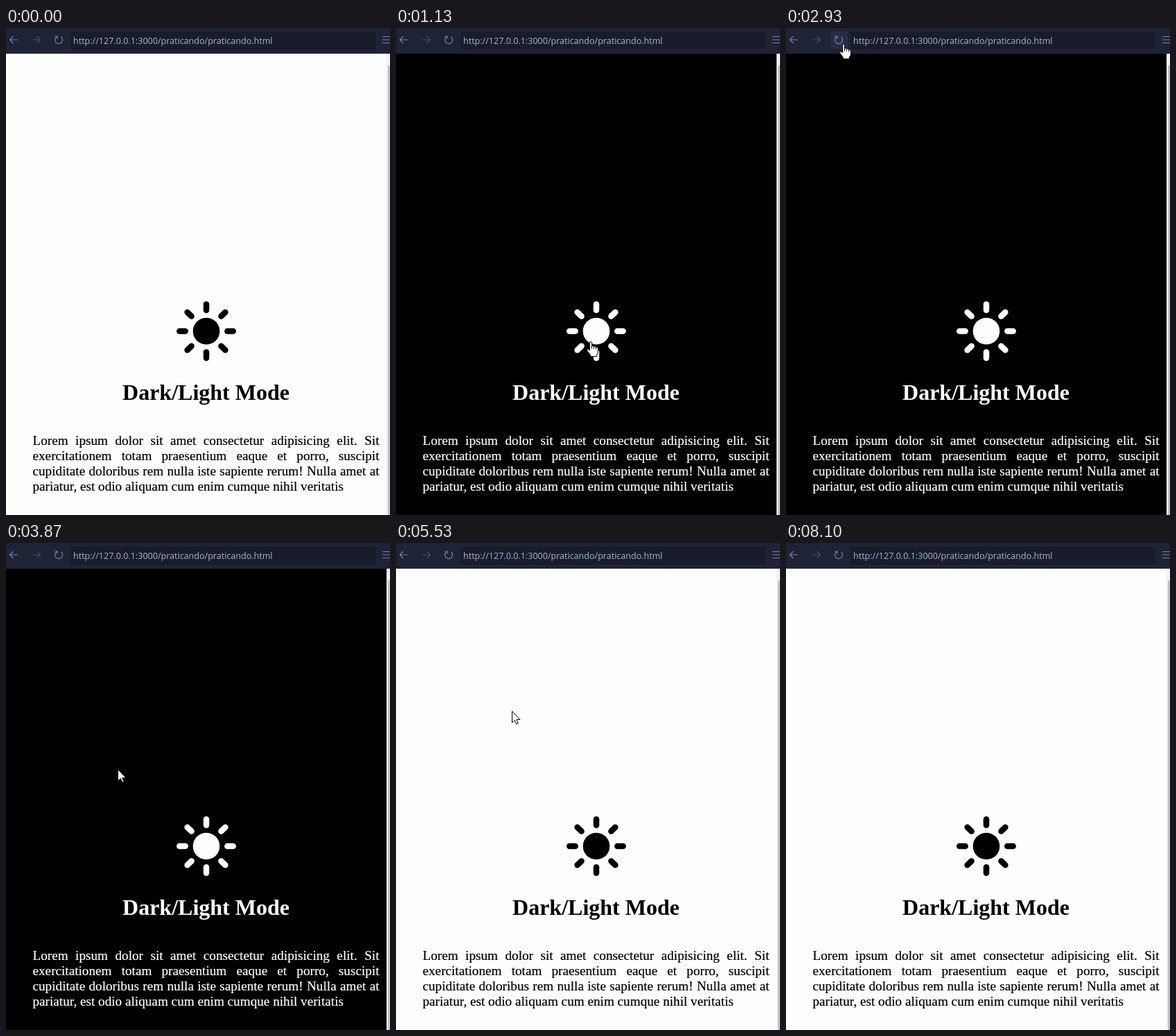
Recreate the animation shown at these times as an HTML page. Size 554 by 702 pixels, loop 8.13 s.

```html
<!DOCTYPE html>
<html lang="en">
<head>
<meta charset="utf-8">
<title>Dark/Light Mode</title>
<style>
  html, body { margin: 0; width: 100%; height: 100%; overflow: hidden; }
  body { --paper: #fefefe; --ink: #000; position: relative; background: var(--paper); color: var(--ink); }
  body.dark { --paper: #000; --ink: #fefefe; }
  svg { position: absolute; left: 0; top: 0; }
  p {
    position: absolute; left: 38.5px; width: 500px; margin: 0; white-space: nowrap;
    font: 19.2px/21px "Liberation Serif", serif; text-align-last: justify;
    -webkit-text-stroke: .2px var(--ink);
  }
  p:last-of-type { text-align-last: left; }
</style>
</head>
<body>
<p style="top:584px">Lorem ipsum dolor sit amet consectetur adipisicing elit. Sit</p>
<p style="top:606px">exercitationem totam praesentium eaque et porro, suscipit</p>
<p style="top:628px">cupiditate doloribus rem nulla iste sapiente rerum! Nulla amet at</p>
<p style="top:650px">pariatur, est odio aliquam cum enim cumque nihil veritatis</p>

<svg width="554" height="702" viewBox="0 0 554 702">
  <!-- browser toolbar -->
  <rect width="554" height="37" fill="#1f2336"/>
  <rect x="93" y="5" width="440" height="26" fill="#191c2a"/>
  <rect id="hover" x="65" y="5" width="24" height="25" fill="#2b2d45"/>
  <g fill="none" stroke="#7884a8" stroke-width="1.2">
    <path d="M17 17H5.5M10.5 12L5.5 17L10.5 22"/>
    <path stroke="#465070" d="M38 17H49.500M44.500 12L49.500 17L44.500 22"/>
    <path d="M73 12.600A5.500 5.500 0 1 0 79.500 12.800M70.500 12H74V15.500"/>
    <path d="M543 12.500H554M543 17H554M543 21.500H554"/>
  </g>
  <text x="97" y="23" font-family="'Open Sans', sans-serif" font-size="12.55" fill="#a9b1d6">http://127.0.0.1:3000/praticando/praticando.html</text>

  <!-- scrollbar -->
  <rect x="549" y="37" width="5" height="665" fill="#f1f1f1"/>
  <rect x="551" y="54" width="3" height="648" fill="#c1c1c1"/>

  <g id="sun" transform="translate(289 437)" fill="var(--ink)" stroke="var(--ink)">
    <circle r="19.3" stroke="none"/>
  </g>
  <text x="288.500" y="536" text-anchor="middle" font-family="'Liberation Serif', serif" font-size="32" font-weight="bold" fill="var(--ink)">Dark/Light Mode</text>

  <g id="cursor" fill="#fff" stroke="#000" stroke-width="1" stroke-linejoin="round">
    <path id="arrow" d="M.5 .5V17L4.300 13.500L6.800 19L9.200 18L6.800 12.500H12Z"/>
    <path id="hand" d="M-1.500 1.500A1.500 1.500 0 0 1 1.500 1.500V6.500Q3 5 4.500 7Q6.500 6 7.500 8Q10.500 7.500 10.500 10V14.500Q10.500 17 8.500 19V21.500H-.5V19.500L-5 13.500Q-6 11.500 -4.500 10.800Q-3 10.500 -1.500 13Z
      M1.500 6.500V10.500M4.500 7V10.500M7.500 8V11"/>
  </g>
</svg>

<script>
const LOOP = 8130;
const DARK_FROM = 1130, DARK_UNTIL = 5200;
const byId = id => document.getElementById(id);

const entry = [345, 706];
// Each move passes through "via" halfway and rests at "to".
const moves = [
  { start: 30,   end: 900,  via: [320, 570], to: [281, 452] },
  { start: 1200, end: 1900, via: [165, 240], to: [83, 23] },
  { start: 3640, end: 4100, via: [160, 325], to: [299, 444] },
  { start: 5270, end: 5790, via: [168, 243], to: [83, 23] },
  { start: 7000, end: 7350, via: [45, 48],   to: [-20, 80] }
];

for (let angle = 0; angle < 360; angle += 45) {
  byId("sun").insertAdjacentHTML("beforeend",
    `<path d="M0 30.300V38.700" stroke-width="8.500" stroke-linecap="round" transform="rotate(${angle})"/>`);
}

function cursorAt(time) {
  let from = entry;
  for (const { start, end, via, to } of moves) {
    if (time < start) break;
    if (time < end) {
      const u = (time - start) / (end - start);
      const e = u * u * (3 - 2 * u);
      return from.map((a, i) => {
        const control = 2 * via[i] - (a + to[i]) / 2;
        return (1 - e) ** 2 * a + 2 * e * (1 - e) * control + e * e * to[i];
      });
    }
    from = to;
  }
  return from;
}

const inside = (x, y, left, top, right, bottom) =>
  x >= left && x <= right && y >= top && y <= bottom;
const show = (id, visible) => byId(id).style.display = visible ? "" : "none";

function draw(now) {
  const time = now % LOOP;
  const [x, y] = cursorAt(time).map(Math.round);
  const onReload = inside(x, y, 65, 5, 89, 30);
  const pointing = onReload || inside(x, y, 246, 394, 332, 480);

  document.body.classList.toggle("dark", time >= DARK_FROM && time < DARK_UNTIL);
  byId("cursor").setAttribute("transform", `translate(${x} ${y})`);
  show("hover", onReload);
  show("hand", pointing);
  show("arrow", !pointing);
  requestAnimationFrame(draw);
}
requestAnimationFrame(draw);
</script>
</body>
</html>
```
